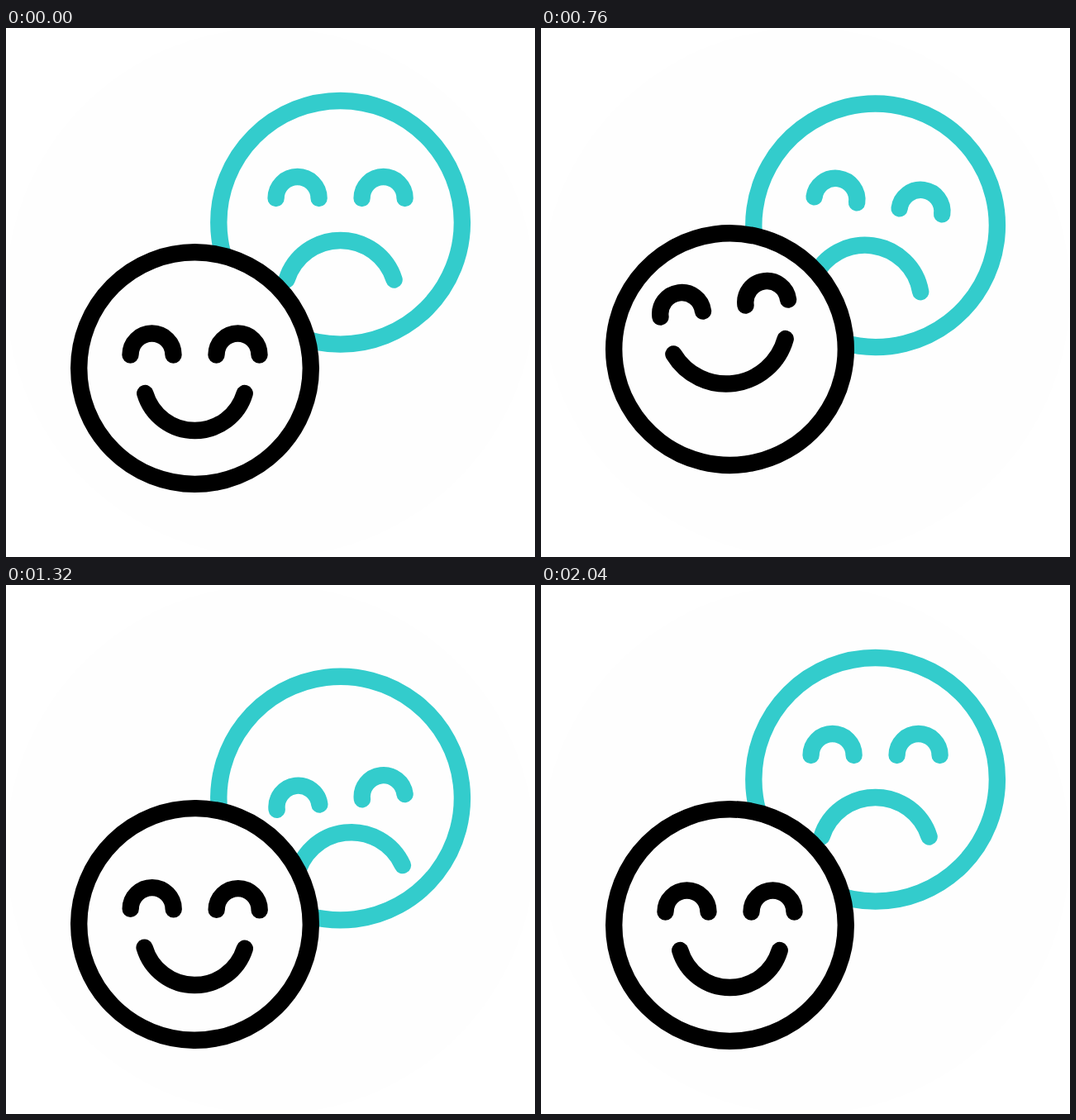
Recreate the animation shown at these times as an HTML page. Size 640 by 640 pixels, loop 2120 ms.

```html
<!DOCTYPE html>
<html lang="en">
<head>
<meta charset="utf-8">
<title>Happy and sad faces</title>
<style>
  html, body { margin: 0; width: 100%; height: 100%; overflow: hidden; background: #fff; }
  svg { display: block; width: 100%; height: 100%; }

  .face, .part {
    animation: 2120ms cubic-bezier(.55, 0, .45, 1) var(--delay) infinite;
    fill: none;
    stroke-width: 20.4;
    stroke-linecap: round;
  }
  .face { animation-name: shift, wobble; }
  .part { animation-name: shift; }
  .smile { animation-name: shift, widen; }
  .head { fill: #fefefe; }

  .happy { --delay: 0s; stroke: #000; }
  .happy .face { --by: -23px; }
  .happy .part { --by: -34px; }

  .sad { --delay: -1600ms; stroke: #3cc; }
  .sad .face { --by: 23px; }
  .sad .part { --by: 34px; }
  .sad .frown { --by: 20.5px; }

  @keyframes shift {
    0%, 1.08% { translate: 0 0; }
    34.67% { translate: 0 var(--by); }
    68.87%, 100% { translate: 0 0; }
  }
  @keyframes wobble {
    0%, 1.08% { rotate: 0deg; }
    19.01% { rotate: 11.8deg; }
    33.73% { rotate: -8deg; }
    49.53% { rotate: 3deg; }
    68.87%, 100% { rotate: 0deg; }
  }
  @keyframes widen {
    0%, 1.08% { d: path("M-60.2 30.5A62.8 62.8 0 0 0 60.2 30.5"); }
    34.67% { d: path("M-68.3 30.5A74.3 74.3 0 0 0 68.3 30.5"); }
    68.87%, 100% { d: path("M-60.2 30.5A62.8 62.8 0 0 0 60.2 30.5"); }
  }
</style>
</head>
<body>
<svg viewBox="0 0 640 640">
  <defs>
    <path id="eyes" d="M-78 0a26 26 0 0 1 52 0M26 0a26 26 0 0 1 52 0"/>
  </defs>
  <circle cx="320" cy="320" r="320" fill="#fefefe"/>
  <g class="sad" transform="translate(404.6 235.3)">
    <g class="face">
      <circle class="head" r="147.3"/>
      <g class="part"><use href="#eyes" y="-29.3"/></g>
      <path class="part frown" d="M-65 69.2A68.2 68.2 0 0 1 65 69.2"/>
    </g>
  </g>
  <g class="happy" transform="translate(228.5 411.6)">
    <g class="face">
      <circle class="head" r="140.3"/>
      <g class="part"><use href="#eyes" y="-16.1"/></g>
      <path class="part smile" d="M-60.2 30.5A62.8 62.8 0 0 0 60.2 30.5"/>
    </g>
  </g>
</svg>
</body>
</html>
```
